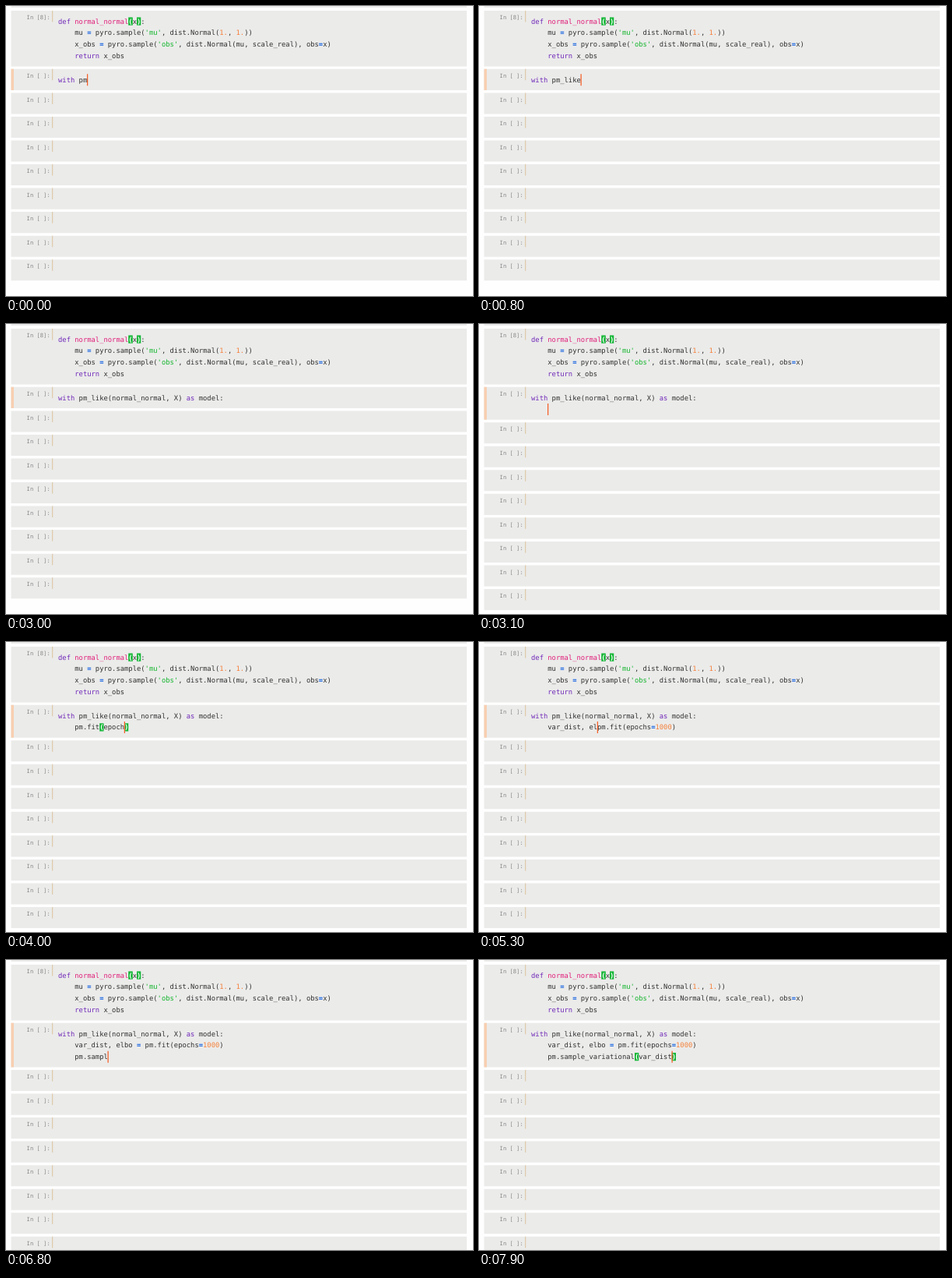
An HTML page for the animation above (8 s loop, 600x372 px).

```html
<!DOCTYPE html>
<html lang="en">
<head>
<meta charset="utf-8">
<title>Notebook typing</title>
<style>
  /* Laid out at four times the size, so that edges can fall between pixels: 1rem is one stage pixel */
  html { font-size: 4px; }
  html, body { margin: 0; width: 100%; height: 100%; overflow: hidden; background: #fefefe; }
  body { position: relative; font-family: "DejaVu Sans Mono", monospace; text-rendering: geometricPrecision; }
  #stage { position: absolute; left: 0; top: 0; width: 600rem; height: 372rem; overflow: hidden; transform: scale(.25); transform-origin: 0 0; }
  #tail { position: absolute; left: 6.5rem; top: 0; width: 585.5rem; height: 2rem; background: #ebebea; }
  #book { position: absolute; left: 6.5rem; top: 5.9rem; width: 585.5rem; }
  .cell { position: relative; box-sizing: border-box; margin-bottom: 3.45rem; padding: 6.4rem 0 5.9rem 60.5rem; background: #ebebea; }
  .cell::after { content: ""; position: absolute; left: 52.6rem; top: 0; width: 1.2rem; height: 14.5rem; background: #dfcaaa; }
  .active::before { content: ""; position: absolute; left: 0; top: 0; bottom: 0; width: 3.5rem; background: #f8cfb1; }
  .prompt { position: absolute; left: 20.1rem; top: 3.6rem; font-size: 7.15rem; line-height: 10rem; color: #888; white-space: pre; }
  .code { position: relative; min-height: 14.8rem; font-size: 8.83rem; line-height: 14.8rem; color: #303030; white-space: pre; }
  .kw { color: #7029b8; }
  .fn { color: #e01e78; }
  .str { color: #12b52a; }
  .num { color: #f5803a; }
  .op { color: #0a5be0; font-weight: bold; }
  .match { color: #fff; background: #13b636; font-weight: bold; }
  #caret { position: absolute; width: 1.3rem; height: 15rem; margin-left: -0.3rem; background: #f55f26; }
</style>
</head>
<body>
<div id="stage">
  <div id="tail"></div>
  <div id="book"></div>
</div>
<script>
const LOOP = 8000, TICK = 100, CHAR = 5.316, LINE = 14.8;

const definition = `def normal_normal(x):
    mu = pyro.sample('mu', dist.Normal(1., 1.))
    x_obs = pyro.sample('obs', dist.Normal(mu, scale_real), obs=x)
    return x_obs`;

// Keys pressed, first tick, last tick
const keys = [
  ["_like", 3, 8], ["(", 10, 10], ["normal_norm", 11, 17], ["al, X", 19, 22],
  [")", 23, 23], [" as model", 24, 27], [":", 28, 28], ["\n", 31, 31],
  ["pm.fit(epoch", 33, 40], ["s=1000", 41, 43], ["HOME", 44, 44],
  ["var_dist, el", 45, 53], ["bo", 54, 54], [" = ", 55, 56], ["END", 57, 57],
  ["\n", 58, 58], ["pm.sample_var", 62, 72], ["iational(var_dist", 73, 79]
];
const caretOff = 30;

const token = /(?<str>'[^']*')|(?<fn>(?<=def )\w+)|\b(?<kw>def|with|as|return)\b|\b(?<num>\d+\.?)|(?<op>=)|[()]/g;

function paint(text, marks) {
  return text.replace(token, (word, ...rest) => {
    const groups = rest.pop();
    const at = rest[rest.length - 2];
    const kind = marks.includes(at) ? "match" : Object.keys(groups).find(k => groups[k]);
    return kind ? `<span class="${kind}">${word}</span>` : word;
  });
}

function pairAt(text, i) {
  if (!text[i] || !"()".includes(text[i])) return [];
  const step = text[i] === "(" ? 1 : -1;
  let depth = 0;
  for (let j = i; j >= 0 && j < text.length; j += step) {
    if (text[j] === "(") depth++;
    if (text[j] === ")") depth--;
    if (depth === 0) return [i, j];
  }
  return [];
}

function press(ed, key) {
  const before = ed.text.slice(0, ed.pos), after = ed.text.slice(ed.pos);
  if (key === ")" && after[0] === ")") { ed.pos++; return; }
  const added = key === "\n" ? "\n    " : key;
  ed.text = before + added + (key === "(" ? ")" : "") + after;
  ed.pos += added.length;
}

function editorAt(tick) {
  const ed = { text: "with pm", pos: 7 };
  for (const [run, from, to] of keys) {
    if (tick < from) break;
    if (run === "HOME") ed.pos = ed.text.lastIndexOf("\n") + 5;
    else if (run === "END") ed.pos = ed.text.length;
    else {
      const share = Math.min(1, (tick - from + 1) / (to - from + 1));
      for (const key of run.slice(0, Math.round(run.length * share))) press(ed, key);
    }
  }
  return ed;
}

const book = document.getElementById("book");
function addCell(label, html = "", kind = "") {
  const cell = document.createElement("div");
  cell.className = "cell " + kind;
  cell.innerHTML = `<div class="prompt">In [${label}]:</div><div class="code">${html}</div>`;
  book.append(cell);
  return cell.lastChild;
}

addCell("8", paint(definition, [17, 19]));
const code = addCell(" ", "", "active");
for (let i = 0; i < 8; i++) addCell(" ");

let shown = -1;
function draw(now) {
  const tick = Math.floor((now % LOOP) / TICK);
  if (tick !== shown) {
    shown = tick;
    const { text, pos } = editorAt(tick);
    const behind = pairAt(text, pos - 1);
    const marks = behind.length ? behind : pairAt(text, pos);
    const rows = text.slice(0, pos).split("\n");
    const x = rows[rows.length - 1].length * CHAR, y = (rows.length - 1) * LINE;
    const caret = tick === caretOff ? "" : `<i id="caret" style="left:${x}rem;top:${y}rem"></i>`;
    code.style.height = text.split("\n").length * LINE + "rem";
    code.innerHTML = paint(text, marks) + caret;
  }
  requestAnimationFrame(draw);
}
draw(performance.now());
</script>
</body>
</html>
```
